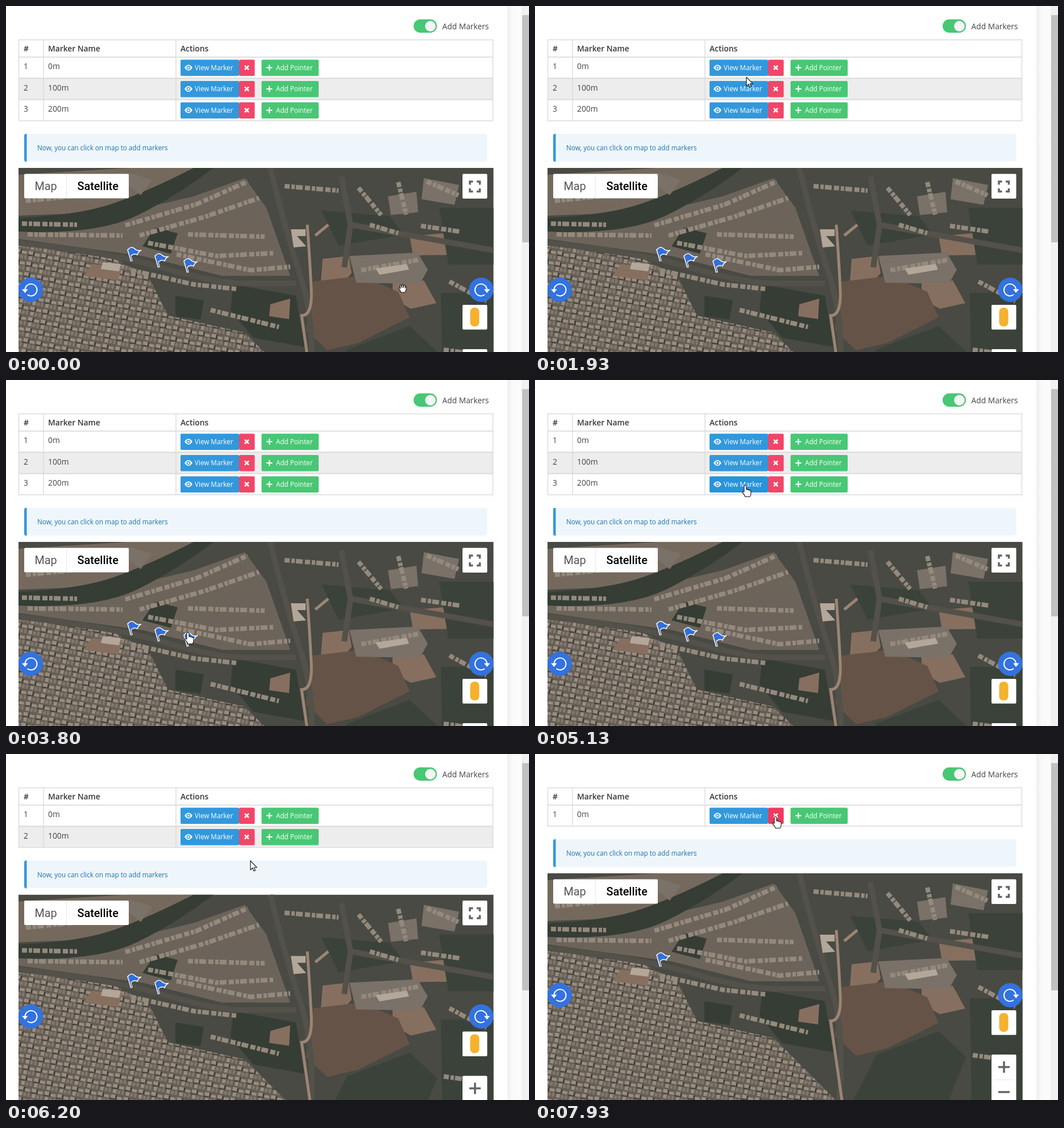
Write an HTML page that moves like this. It is 920x609 px and loops after 8 s.

```html
<!DOCTYPE html>
<html lang="en">
<head>
<meta charset="utf-8">
<title>Map markers</title>
<style>
  html, body { margin: 0; width: 100%; height: 100%; overflow: hidden; background: #fff; }
  svg { display: block; font: 13.8px "Open Sans", "Noto Sans", sans-serif; fill: #444; }
  .bold { font-weight: 600; fill: #363636; }
  .small { font-size: 11.7px; }
  .label { font: 19.8px Roboto, sans-serif; }
  .line { fill: none; stroke: #dbdbdb; stroke-width: 1.4; }
  .icon { fill: none; stroke: #fff; stroke-width: 2; }
  .tool { fill: none; stroke: #666; stroke-width: 3.6; }
  .houses { fill: none; stroke: #93897c; stroke-width: 8; stroke-dasharray: 9 3 6 2 12 4; }
  .cursor { fill: #fff; stroke: #111; stroke-width: 1.1; stroke-linejoin: round; }
</style>
</head>
<body>
<svg width="920" height="609" viewBox="0 0 920 609">
  <defs>
    <clipPath id="mapClip"><path d="M22 0H857.5V400H22z"/></clipPath>
    <linearGradient id="edge"><stop stop-color="#eee"/><stop offset=".35" stop-color="#fafafa"/><stop offset="1" stop-color="#fbfbfb"/></linearGradient>
    <pattern id="dense" width="23" height="19" patternUnits="userSpaceOnUse" patternTransform="rotate(12)">
      <path fill="#655e55" d="M0 0h23v19H0z"/>
      <path fill="#998d80" d="M1 1h8v6H1zM12 3h9v5h-9zM3 10h6v7H3z"/>
      <path fill="#81776c" d="M11 11h5v6h-5zM18 10h4v7h-4z"/>
      <path fill="#403f3a" d="M9 1h3v8H9zM0 8h8v2H0z"/>
    </pattern>
    <g id="spin">
      <circle r="21.5" fill="#3372df"/>
      <path class="icon" stroke-width="3" d="M-10 1A10.5 10.5 0 1 1-6 8.5"/>
      <path fill="#fff" d="M-15.5-1H-5L-10 5.5z"/>
    </g>
  </defs>

  <path fill="url(#edge)" d="M882 0h25v609h-25z"/>
  <path fill="#f1f1f1" d="M907 0h13v609h-13z"/>
  <path fill="#c1c1c1" d="M908 16h12v400h-12z"/>

  <rect x="717" y="23.5" width="41" height="23.5" rx="11.7" fill="#48c774"/>
  <circle cx="746.5" cy="35.5" r="9.3" fill="#f5f5f5"/>
  <text x="767.5" y="41">Add Markers</text>

  <path class="line" d="M22.5 59.5H856.5V90H22.5zM66 59.5V90M299 59.5V90"/>
  <g class="bold"><text x="31" y="79.5">#</text><text x="74" y="79.5">Marker Name</text><text x="307" y="79.5">Actions</text></g>
  <g id="rows"></g>

  <g id="lower">
    <rect x="32" y="-60" width="814.5" height="48.5" rx="4" fill="#eef6fc"/>
    <path fill="#3298dc" d="M36.500-60H35q-3 0-3 4v41q0 4 3 4h1.500z"/>
    <text class="small" x="55" y="-31" style="fill:#1d72aa">Now, you can click on map to add markers</text>

    <g clip-path="url(#mapClip)">
      <path fill="#484a43" d="M22 0H858V400H22z"/>
      <path fill="#6c645a" d="M22 105L195 82L330 50L420 18L458 70L500 190L380 190L240 155L22 125z"/>
      <path fill="url(#dense)" d="M22 135L190 160L250 190L285 260L420 290L530 400H22z"/>
      <path fill="#75695d" d="M22 12L215 0H330L265 42L180 78L22 84z"/>
      <path fill="#353d35" d="M22 88Q130 83 190 62T330 0H365Q300 50 230 84T22 112zM262 105l40 10-12 36-50-13zM298 225l50 8-6 34-44-6zM400 205l110 20 15 90-90-16-40-48z"/>
      <path fill="#876f5f" d="M557 160l46-5 5 30-20 23-34-9zM710 120l60-5 20 38-74 1zM680 203l55-5 22 40-45 10-32-19zM150 170l55 3-8 25-60-8zM465 240l35-10-2 36-35-5z"/>
      <path fill="#665347" d="M540 200L625 190L690 218L710 263L620 308L565 321L528 286z"/>
      <path fill="#7a7168" d="M604 155l120-6 18 30-14 25-112-2zM215 8l42 13-20 27-25-20zM735 18l62 12-8 35-58-10zM672 50l50-8 3 36-48 5z"/>
      <path fill="#3b423a" d="M555 75l120 10 25 32-115 20zM600 320l110-42 48 45-30 77H560zM762 70h96v100h-80zM765 220h93v180h-90z"/>
      <path fill="none" stroke="#535149" stroke-width="10" d="M22 132Q180 148 280 177T430 203H510M465 0Q490 105 518 190T535 400M590 15L606 100L595 175M606 100L858 145"/>
      <path fill="none" stroke="#9b8575" stroke-width="5" d="M530 100Q535 170 537 215T520 260L540 400M544 119L567 100"/>
      <path class="houses" d="M35 58L185 43M28 98L125 100M38 117L205 119M210 101L335 64L425 24M235 119L350 86L445 53M320 117L455 121M250 132L370 155L470 150M300 152L430 180L500 174M220 180L330 205L405 213M360 250L480 280M490 32L585 40M620 35L660 83M690 25L704 82M740 24L796 48M640 100L690 115M730 102L798 112M625 180L725 162M780 200L845 235M770 320L842 330"/>
      <path fill="#b3a79a" d="M501 108h26v12h-15l16 18-22 2zM650 177l55-8 4 10-52 9zM170 166l32 3-3 13-32-4z"/>
    </g>

    <path fill="#fff" d="M34 10.500H214q2 0 2 2V51.500q0 2-2 2H34q-2 0-2-2V12.500q0-2 2-2z"/>
    <path stroke="#e6e6e6" d="M106.500 10.500V53.500"/>
    <text class="label" x="50.500" y="39" style="fill:#565656">Map</text>
    <text class="label" x="125.500" y="39" style="fill:#000;font-weight:500">Satellite</text>
    <g fill="#fff">
      <rect x="803" y="10.500" width="43.500" height="43.500" rx="2"/>
      <rect x="803" y="241" width="43.500" height="43.500" rx="2"/>
      <rect x="803" y="319" width="43.500" height="88" rx="2"/>
    </g>
    <path class="tool" d="M816 29.500V24H821.500M828 24H833.500V29.500M833.500 36V41.500H828M821.500 41.500H816V36"/>
    <rect x="816.500" y="246" width="16" height="33" rx="7" fill="#f5b22d"/>
    <path class="tool" d="M815 341h20M825 331v20M815 385h20"/>
    <path stroke="#e6e6e6" d="M808 363.500h34"/>
    <use href="#spin" x="43.500" y="214.500"/>
    <use href="#spin" transform="translate(836 214.500) scale(-1 1)"/>
    <g id="flags"></g>
  </g>

  <g id="pointer" class="cursor">
    <path d="M0 0V16L3.700 12.500L6 18L8.600 17L6.300 11.700H11.300z"/>
    <path d="M-2 1.500Q0-1 2 1.500V8Q4 6.500 5 8.500Q7 7.500 8 9.500Q10 9 10 11V15Q10 18 8 20.500H0Q-1 17-5 13Q-6 10-2 12z"/>
    <path d="M-3.500 7Q-4 4-7 1Q-7.500-2-4 0L-5-5Q-3.500-7-2.500-5L-1.500-1.500V-6Q0-8 1-6V-1.500L2.500-5.500Q4.500-6.500 4.500-4L4-.5L5-3Q7-3.500 6.500-1Q6 3 4 7z"/>
  </g>
</svg>
<script>
const $ = id => document.getElementById(id);
const LOOP = 8000, TICK = 200 / 3, PITCH = 37.5;
const removals = [6200, 7467], presses = [[6000, 6200], [7267, 7467]];
const flagSpots = [[214, 139], [262, 150], [313, 159]];

// Left edge, right edge, idle, hover and pressed colours
const buttons = [
  [307, 410, '#3298dc', '#2793da', '#238cd1'],
  [410, 437.5, '#f14668', '#f03a5f', '#ee2049'],
  [449.5, 550, '#48c774', '#3ec46d', '#3abb67'],
];

// Pointer stops: time, x, y
const stops = [
  [0, 698, 497], [667, 698, 497], [867, 650, 340], [1000, 580, 210], [1133, 537, 149],
  [1267, 537, 149], [1467, 449, 162], [1667, 449, 162], [1933, 372, 125], [2133, 345, 145],
  [2400, 345, 178], [2533, 362, 184], [2600, 342, 184], [2933, 342, 184], [3000, 357, 180],
  [3200, 357, 180], [3467, 340, 290], [3667, 322, 420], [3800, 320, 444], [3867, 314, 451],
  [4000, 272, 442], [4067, 272, 442], [4267, 225, 437], [4333, 200, 440], [4600, 330, 260],
  [4800, 438, 188], [4933, 385, 187], [5133, 370, 185], [5400, 322, 187], [5800, 431, 190],
  [6133, 431, 190], [6200, 430, 188], [6667, 430, 188], [6933, 422, 143], [7000, 422, 143],
  [7067, 424, 141], [7667, 424, 141], [7933, 423, 110], [LOOP, 423, 110],
];

$('rows').innerHTML = ['0m', '100m', '200m'].map((name, i) => `
  <g transform="translate(0 ${90 + PITCH * i})">
    <path class="line" style="fill:${i % 2 ? '#ededed' : '#fff'}" d="M22.5 0H856.5V37H22.5zM66 0V37M299 0V37"/>
    <text x="31" y="21">${i + 1}</text><text x="74" y="21">${name}</text>
    ${buttons.map(([a, b]) => `<rect class="btn" x="${a}" y="4.5" width="${b - a}" height="28.5" rx="2"/>`).join('')}
    <path fill="#fff" d="M314 18.500Q321 8.500 328 18.500Q321 28.500 314 18.500z"/>
    <circle cx="321" cy="18.500" r="2.600" fill="#fff" stroke="#3298dc" stroke-width="1.500"/>
    <path class="icon" style="stroke-width:2.5" d="M420 15l7 7M427 15l-7 7"/>
    <path class="icon" d="M458 18.500h10.500M463.300 13.200v10.500"/>
    <g class="small" fill="#fff"><text x="332" y="22.500">View Marker</text><text x="475" y="22.500">Add Pointer</text></g>
  </g>`).join('');

$('flags').innerHTML = flagSpots.map(([x, y]) => `
  <g transform="translate(${x} ${y})" stroke-linejoin="round">
    <path d="M1 4L7 25" stroke="#fff" stroke-width="4"/>
    <path d="M1 4Q7-2 12 3T23.500 6Q18 9 17 14Q11 10 5 17z" fill="#2f6fde" stroke="#fff" stroke-width="1.500"/>
    <path d="M1.500 5L7 24" stroke="#2f5fae" stroke-width="1.400"/>
  </g>`).join('');

const rows = [...$('rows').children], flags = [...$('flags').children];
const show = (el, on) => el.style.display = on ? '' : 'none';

function pointerAt(t) {
  const i = Math.max(1, stops.findIndex(s => s[0] >= t));
  const [t0, x0, y0] = stops[i - 1], [t1, x1, y1] = stops[i];
  const k = (t - t0) / (t1 - t0);
  return [x0 + (x1 - x0) * k, y0 + (y1 - y0) * k];
}

function draw(now) {
  const t = Math.floor((now % LOOP + 4) / TICK) * TICK + .5;
  const [x, y] = pointerAt(Math.min(t, LOOP));
  const count = 3 - removals.filter(r => t >= r).length;
  const top = 172.5 + PITCH * count;
  const pressed = presses.some(([a, b]) => t >= a && t < b);
  let link = false;

  rows.forEach((row, i) => {
    show(row, i < count);
    const dy = y - 94.5 - PITCH * i;
    row.querySelectorAll('.btn').forEach((el, j) => {
      const [a, b, idle, hover, press] = buttons[j];
      const over = i < count && x >= a && x < b && dy >= 0 && dy < 28.5;
      link = link || over;
      el.style.fill = !over ? idle : pressed ? press : hover;
    });
  });
  flagSpots.forEach(([fx, fy], i) => {
    show(flags[i], i < count);
    const dx = x - fx, dy = y - top - fy;
    link = link || i < count && dx >= 0 && dx < 24 && dy >= -2 && dy < 25;
  });

  $('lower').setAttribute('transform', `translate(0 ${top})`);
  $('pointer').setAttribute('transform', `translate(${x} ${y})`);
  const shape = link ? 1 : y > top ? 2 : 0;
  [...$('pointer').children].forEach((el, i) => show(el, i === shape));
}

const start = performance.now();
(function loop() {
  draw(performance.now() - start);
  requestAnimationFrame(loop);
})();
</script>
</body>
</html>
```
